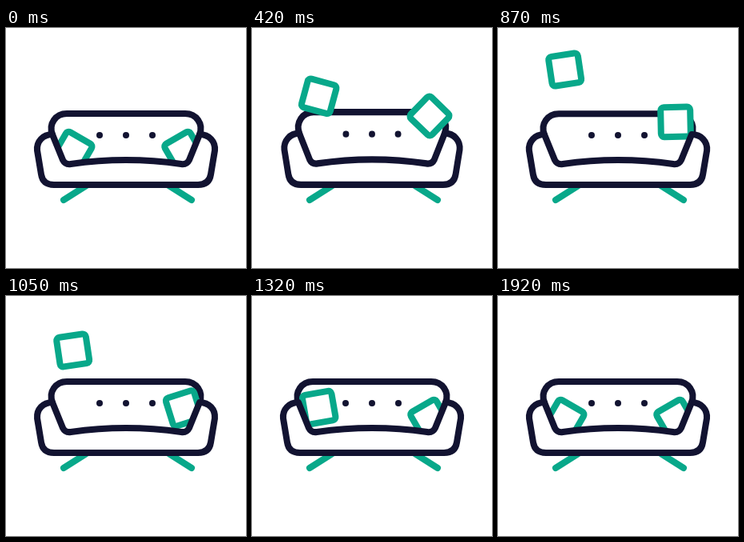
Animation of 300 by 300 pixels, one loop 3950 ms. Source, as an HTML page:

```html
<!DOCTYPE html>
<html lang="en">
<head>
<meta charset="utf-8">
<title>Sofa</title>
<style>
  html, body { margin: 0; width: 100%; height: 100%; overflow: hidden; background: #fff; }
  svg { display: block; width: 100vw; height: 100vh; }
  .line { fill: #fff; stroke: #121331; stroke-width: 8; stroke-linecap: round; stroke-linejoin: round; }
  .teal { fill: #fff; stroke: #08a88a; stroke-width: 8; stroke-linecap: round; }
</style>
</head>
<body>
<svg viewBox="0 0 300 300">
  <path class="teal" d="M72 215L102 196M232 215L202 196"/>
  <g class="sofa">
    <path class="line" d="M58 133C53 120 62 107 76 107H224C238 107 247 120 242 133"/>
    <g fill="#121331">
      <circle cx="117" cy="134" r="4"/>
      <circle cx="150" cy="134" r="4"/>
      <circle cx="183" cy="134" r="4"/>
    </g>
  </g>
  <rect id="left" class="teal" x="-18.5" y="-18.5" width="37" height="37" rx="4"/>
  <rect id="right" class="teal" x="-18.5" y="-18.5" width="37" height="37" rx="4"/>
  <g class="sofa">
    <path class="line" d="M58 133L71 165Q74 171 81 170Q150 160 219 170Q226 171 229 165L242 133C254 133 262 142 261 153L256 183Q254 196 240 196H60Q46 196 44 183L39 153C38 142 46 133 58 133Z"/>
  </g>
</svg>
<script>
const LOOP = 3950, MOVE = 1920, SEAT = 153.5;

// Bezier easing with level ends; a and b are the x of its two handles.
const ease = (a, b) => u => {
  let lo = 0, hi = 1;
  for (let i = 0; i < 24; i++) {
    const s = (lo + hi) / 2, r = 1 - s;
    if (3 * r * r * s * a + 3 * r * s * s * b + s ** 3 < u) lo = s; else hi = s;
  }
  return lo * lo * (3 - 2 * lo);
};
const smooth = ease(1 / 3, 2 / 3);
const burst = ease(.455, .142);
const toss = ease(.43, .46);
const drop = ease(.62, .52);

// Eased progress from 0 to 1 between two times.
const span = (t, from, to, easing) =>
  easing(Math.min(1, Math.max(0, (t - from) / (to - from))));

// The sofa sinks, then springs back with a damped wobble.
function squash(t) {
  const d = t - 255;
  return d < 0 ? span(t, 0, 255, smooth) : Math.exp(-d / 175) * Math.cos(Math.PI * d / 157);
}

const leftPose = t => ({
  x: 83.7,
  y: SEAT - 102.5 * (span(t, 150, 800, burst) - span(t, 800, 1500, drop)),
  turn: 120 - 128.5 * span(t, 0, 580, smooth) - 51.5 * span(t, 1260, 1800, burst)
});

const rightPose = t => ({
  x: 222,
  y: SEAT - 58 * (span(t, 150, 600, toss) - span(t, 600, 1250, smooth)),
  turn: 60 - 90 * span(t, 80, 1350, smooth)
});

const sofa = document.querySelectorAll(".sofa");
const left = document.getElementById("left");
const right = document.getElementById("right");

function place(el, { x, y, turn }) {
  el.setAttribute("transform", `translate(${x} ${y}) rotate(${turn})`);
}

function draw(t) {
  const s = squash(t);
  const pose = `translate(150 200) scale(${1 + .034 * s} ${1 - .052 * s}) translate(-150 -200)`;
  sofa.forEach(g => g.setAttribute("transform", pose));
  place(left, leftPose(t));
  place(right, rightPose(t));
}

const start = performance.now();
function tick() {
  draw(Math.min((performance.now() - start) % LOOP, MOVE));
  requestAnimationFrame(tick);
}
tick();
</script>
</body>
</html>
```
